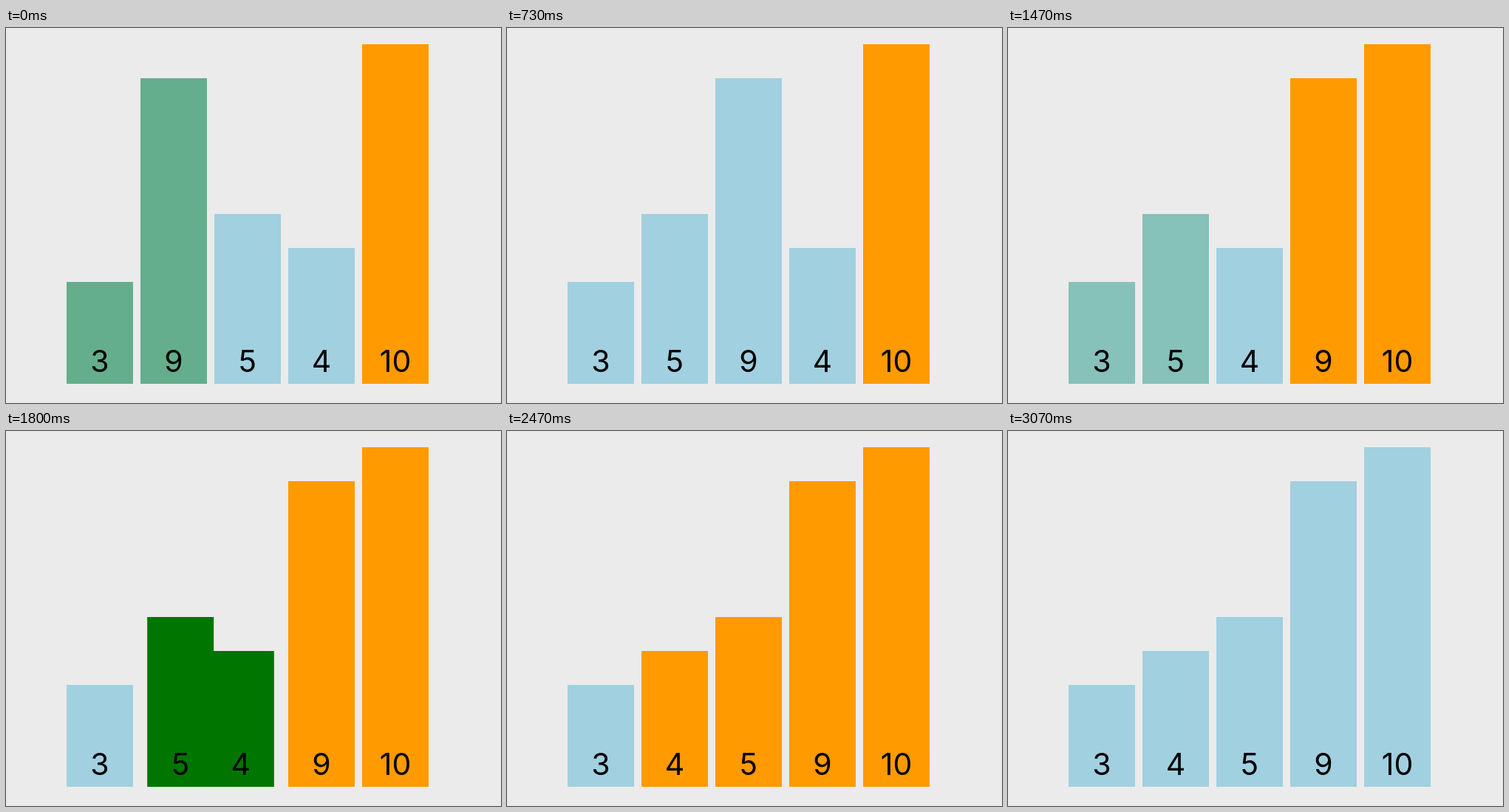
Recreate the animation shown at these times as an HTML page with a canvas. Size 670x508 px, loop 3.99 s.

```html
<!DOCTYPE html>
<html lang="en">
<head>
<meta charset="utf-8">
<title>Bubble sort</title>
<style>
  html, body { margin: 0; width: 100%; height: 100%; overflow: hidden; background: #ebebeb; }
  canvas { display: block; }
</style>
</head>
<body>
<canvas width="670" height="508"></canvas>
<script>
const ctx = document.querySelector('canvas').getContext('2d');
const LOOP = 3990, TICK = 1000 / 15;
const FADE = 180, MOVE = 175;               // transition lengths in ms
const HOLD = 167, SWAP = 100, PAUSE = 245;  // waits of the sorting loop in ms
const BLUE = [161, 208, 224], GREEN = [0, 118, 0], ORANGE = [255, 154, 0];

// CSS-style cubic-bezier easing, solved by bisection
function bezier(x1, y1, x2, y2) {
  const at = (p, q, s) => 3 * p * s * (1 - s) ** 2 + 3 * q * s * s * (1 - s) + s ** 3;
  return x => {
    if (x <= 0) return 0;
    if (x >= 1) return 1;
    let lo = 0, hi = 1;
    for (let i = 0; i < 24; i++) {
      const mid = (lo + hi) / 2;
      if (at(x1, x2, mid) < x) lo = mid; else hi = mid;
    }
    return at(y1, y2, lo);
  };
}
const ease = bezier(.25, .1, .25, 1);
const easeInOut = bezier(.42, 0, .58, 1);

const bars = [3, 9, 5, 4, 10].map((value, slot) => ({
  value, slot, color: value === 10 ? ORANGE : BLUE, fades: [], moves: []
}));

// Run the remaining passes once and record when each bar fades or moves
function schedule() {
  const order = [...bars];
  let time = -232;
  for (let end = 3; end > 0; end--) {
    for (let j = 0; j < end; j++) {
      const [a, b] = [order[j], order[j + 1]];
      const swap = a.value > b.value;
      for (const bar of [a, b]) bar.fades.push({ time, color: GREEN });
      time += HOLD + (swap ? SWAP : 0);
      if (swap) {
        a.moves.push({ time: time - 120, by: 1 });
        b.moves.push({ time: time - 120, by: -1 });
        order[j] = b;
        order[j + 1] = a;
      }
      order[j].fades.push({ time, color: BLUE });
      order[j + 1].fades.push({ time, color: j + 1 === end ? ORANGE : BLUE });
      time += PAUSE;
    }
  }
  for (const bar of bars) bar.fades.push({ time: time + 172, color: BLUE });
}

function colorAt(bar, t) {
  let color = bar.color;
  bar.fades.forEach((fade, i) => {
    const next = bar.fades[i + 1];
    const until = next ? Math.min(t, next.time) : t;
    const k = ease((until - fade.time) / FADE);
    color = color.map((c, n) => c + (fade.color[n] - c) * k);
  });
  return `rgb(${color.map(Math.round)})`;
}

function draw(t) {
  ctx.fillStyle = '#ebebeb';
  ctx.fillRect(0, 0, 670, 508);
  ctx.font = '41px Inter, "Liberation Sans", sans-serif';
  ctx.textAlign = 'center';
  for (const bar of bars) {
    const slot = bar.moves.reduce(
      (s, m) => s + m.by * easeInOut((t - m.time) / MOVE), bar.slot);
    const x = 82 + 100 * slot, height = 46 * bar.value;
    ctx.fillStyle = colorAt(bar, t);
    ctx.fillRect(x, 482 - height, 90, height);
    ctx.fillStyle = '#000';
    ctx.fillText(bar.value, x + 45, 466);
  }
}

schedule();
const start = performance.now();
function frame() {
  const t = (performance.now() - start) % LOOP;
  draw(Math.floor(t / TICK + 1e-6) * TICK);
  requestAnimationFrame(frame);
}
frame();
</script>
</body>
</html>
```
